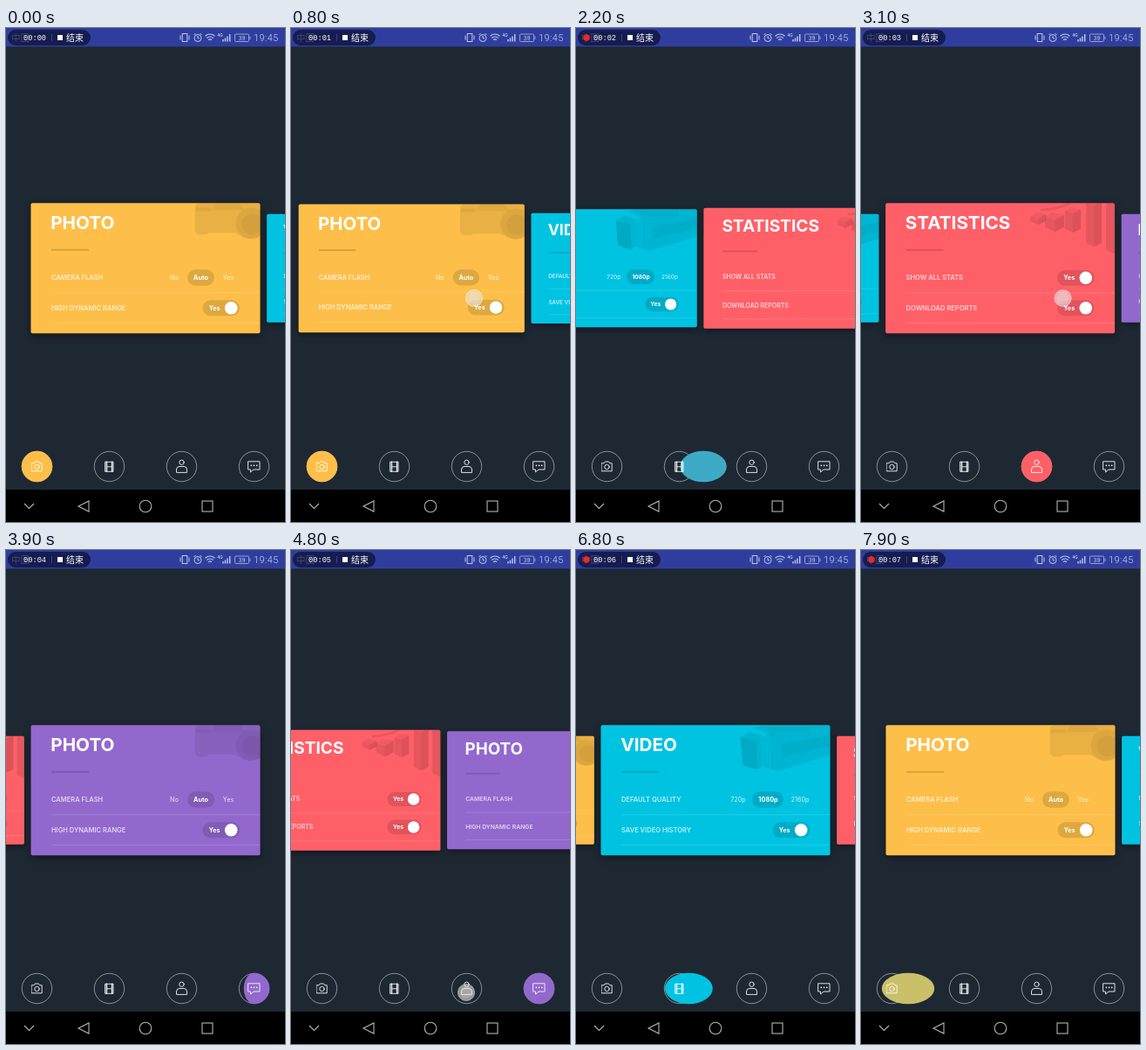
An HTML page for the animation above (8000 ms loop, 320 by 565 pixels).

```html
<!DOCTYPE html>
<html lang="en">
<head>
<meta charset="utf-8">
<title>Settings cards</title>
<style>
  html, body { margin: 0; width: 100%; height: 100%; overflow: hidden; background: #1e2833; }
  svg { display: block; width: 100%; height: 100%; }
  text { font-family: Inter, "Noto Sans CJK SC", sans-serif; fill: #fff; }
  .title { font-size: 20.7px; font-weight: 700; }
  .label { font-size: 7.55px; font-weight: 600; opacity: .72; }
  .option { font-size: 7.3px; text-anchor: middle; opacity: .8; }
  .chosen { font-weight: 700; opacity: 1; }
  .mono { font-family: "Liberation Mono", monospace; font-size: 8.7px; }
  .time { font-family: Roboto, sans-serif; font-size: 10.8px; font-weight: 300; letter-spacing: .5px; opacity: .8; }
  .shadow { filter: drop-shadow(0 3px 4px rgba(0, 0, 0, .4)); }
  .line { fill: none; stroke: #fff; stroke-width: .95; stroke-linejoin: round; stroke-linecap: round; opacity: .9; }
  .nav { fill: none; stroke: #b5b5b5; stroke-width: 1.1; }
  .status { fill: none; stroke: #c3c9e6; stroke-width: 1; }
</style>
</head>
<body>
<svg viewBox="0 0 320 565" preserveAspectRatio="none">
  <defs>
    <clipPath id="face"><rect width="263" height="149" rx="2"/></clipPath>
    <g id="camera">
      <path d="M188 5Q189 0 195 0H263V38Q250 44 240 37L234 34H204L201 36H192Q188 35 188 29Z" opacity=".08"/>
      <path d="M206 8L212 0H240L246 8Z" opacity=".04"/>
      <circle cx="253" cy="23" r="18" opacity=".05"/>
      <circle cx="254" cy="24" r="12" opacity=".04"/>
      <path d="M188 9H206V5H190Z" opacity=".05"/>
    </g>
    <g id="camcorder">
      <path d="M160 14L171 8L184 12V48L180 51L163 46Z" opacity=".08"/>
      <path d="M160 14L178 19L180 51L163 46Z" opacity=".06"/>
      <path d="M184 14L197 9V51L184 47Z" opacity=".06"/>
      <path d="M176 3L186 0H263V34L202 53L196 50V12Z" opacity=".07"/>
      <path d="M190 3H240V9H194ZM206 22L263 11V24L208 37Z" opacity=".04"/>
    </g>
    <g id="bars"></g>
  </defs>

  <rect width="320" height="565" fill="#1e2833"/>
  <g id="cards"></g>

  <g id="rings" fill="none" stroke="#fff" stroke-width=".8" opacity=".6"></g>
  <path id="bubble"/>
  <g class="line">
    <path d="M29.5 497.8H32L33.3 496H37.5L38.8 497.8H41.2V506.8H29.5Z"/>
    <circle cx="35.5" cy="502" r="2.7"/>
  </g>
  <g class="line">
    <rect x="114" y="496.3" width="9" height="11"/>
    <path d="M115.4 496.3V507.3M121.6 496.3V507.3" stroke-width="1.6"/>
    <path d="M116 501.8H121"/>
  </g>
  <g class="line">
    <circle cx="201.5" cy="496.8" r="2.7"/>
    <path d="M195.5 508V505Q195.5 501.5 199 501.5H204Q207.5 501.5 207.5 505V508Z"/>
  </g>
  <g class="line">
    <path d="M278 495.8H291V505H284L280.5 508V505H278Z"/>
    <path d="M281.3 500.4h.1M284.5 500.4h.1M287.7 500.4h.1" stroke-width="1.6"/>
  </g>

  <rect y="528" width="320" height="37"/>
  <g class="nav">
    <path d="M21 544L26.5 549.5L32 544"/>
    <path d="M95 541V553L83 547Z"/>
    <circle cx="160" cy="547" r="6.8"/>
    <rect x="225" y="541" width="12" height="12"/>
  </g>

  <rect width="320" height="21.3" fill="#2f3e9e"/>
  <rect x="2" y="2" width="95" height="18" rx="9" fill="#151d50"/>
  <text x="6" y="15" font-size="10.5" opacity=".2">中国</text>
  <circle id="rec" cx="12" cy="11" r="3.7" fill="#f5261f"/>
  <text id="clock" class="mono" x="20" y="14"></text>
  <path d="M52.5 7V15" stroke="#3b4474"/>
  <rect x="59" y="8" width="6" height="6" fill="#fff"/>
  <text x="69" y="14.8" font-size="10">结束</text>

  <g class="status">
    <rect x="202.2" y="6.5" width="5.6" height="9"/>
    <path d="M200 8.5V13.5M210 8.5V13.5"/>
    <circle cx="220" cy="11.5" r="4"/>
    <path d="M220 9V11.8H222M215.5 8L217.5 6M224.5 8L222.5 6"/>
    <path d="M228.5 9.2Q234 4.8 239.5 9.2M230.3 11.5Q234 8.5 237.7 11.5M232 13.6Q234 12 236 13.6M234 15.2v.3" stroke-width="1.2"/>
    <path d="M249 15.5V13M251.5 15.5V11.5M254 15.5V9.5M256.7 15.5V7" stroke-width="1.4"/>
    <g opacity=".7">
      <rect x="262.5" y="7" width="16" height="8.5" rx="1"/>
      <path d="M280 9.5V13"/>
    </g>
  </g>
  <text x="242.3" y="9.5" font-size="4.6">4G</text>
  <text x="270.5" y="13.8" font-size="6.5" text-anchor="middle" opacity=".75">39</text>
  <text class="time" x="284" y="15">19:45</text>

  <g id="touch">
    <circle r="9.6" fill="#e2e2e2" fill-opacity=".6" stroke="#fff" stroke-opacity=".4"/>
    <circle r="7" fill="#fff" fill-opacity=".15"/>
  </g>
</svg>
<script>
const $ = id => document.getElementById(id);
const COLORS = [[253, 191, 73], [0, 195, 226], [255, 96, 104], [147, 104, 205]];
const TAB_X = [35.5, 118.5, 201.5, 284.5], TAB_Y = 501.5, RADIUS = 17.8;
const rgb = c => `rgb(${c.map(Math.round)})`;
const clamp = v => Math.max(0, Math.min(1, v));
const mix = (a, b, k) => a + (b - a) * k;
const easeOut = (u, n) => 1 - (1 - clamp(u)) ** n;
const backOut = u => {
  const w = 1 - clamp(u);
  return 1 - 2.7 * w ** 3 + 1.7 * w ** 2;
};

// Each bar is a column: centre, top, half width, height
const bar = ([x, y, w, h]) => `
  <path d="M${x - w} ${y}L${x - w / 4} ${y - w / 2}L${x + w} ${y - w / 4}L${x} ${y + w / 3}Z" opacity=".06"/>
  <path d="M${x - w} ${y}L${x} ${y + w / 3}V${y + h}L${x - w} ${y + h - w / 2}Z" opacity=".1"/>
  <path d="M${x} ${y + w / 3}L${x + w} ${y - w / 4}V${y + h - w / 2}L${x} ${y + h}Z" opacity=".14"/>`;
$('bars').innerHTML = [[175, 15, 9, 10], [194, 16, 11, 17], [215, 9, 9, 25], [239, 0, 9, 50], [262, -12, 9, 70]].map(bar).join('')
  + '<path d="M178 8Q196 7 212 0" fill="none" stroke="#000" stroke-width="3" opacity=".09"/>';

const pill = (x, y, w, h) => `<rect x="${x}" y="${y}" width="${w}" height="${h}" rx="${h / 2}" opacity=".12"/>`;
const option = (x, s, on) => `<text class="option ${on ? 'chosen' : ''}" x="${x}" y="88.2">${s}</text>`;
const toggle = y => pill(197, y - 9, 42.5, 18)
  + `<text class="option chosen" x="210.7" y="${y + 2.7}">Yes</text><circle cx="229.7" cy="${y}" r="7.3" fill="#fff"/>`;
const flash = pill(179.5, 76, 31, 18.5) + option(164.5, 'No') + option(195, 'Auto', 1) + option(226.5, 'Yes');
const quality = pill(173.5, 76, 36, 18.5) + option(157.5, '720p') + option(192, '1080p', 1) + option(228.5, '2160p');

const PAGES = [
  ['PHOTO', 'CAMERA FLASH', 'HIGH DYNAMIC RANGE', flash, 'camera'],
  ['VIDEO', 'DEFAULT QUALITY', 'SAVE VIDEO HISTORY', quality, 'camcorder'],
  ['STATISTICS', 'SHOW ALL STATS', 'DOWNLOAD REPORTS', toggle(85.5), 'bars'],
  ['PHOTO', 'CAMERA FLASH', 'HIGH DYNAMIC RANGE', flash, 'camera']
];
$('cards').innerHTML = PAGES.map(([title, first, second, control, art], i) => `
  <g><rect class="shadow" width="263" height="149" rx="2" fill="${rgb(COLORS[i])}"/>
  <g clip-path="url(#face)">
    <use href="#${art}"/>
    <text class="title" x="22.7" y="29.7">${title}</text>
    <rect x="23.5" y="52.5" width="43" height="2" opacity=".15"/>
    <path d="M23.5 102.5H263M23.5 137H263" stroke="#fff" stroke-width=".8" opacity=".18"/>
    <text class="label" x="23.4" y="88.2">${first}</text>
    <text class="label" x="23.4" y="122.8">${second}</text>
    ${control}${toggle(120)}
  </g></g>`).join('');
const cards = [...$('cards').children];
$('rings').innerHTML = TAB_X.map(x => `<circle cx="${x}" cy="${TAB_Y}" r="17.2"/>`).join('');

// Swipes: drag for 300 ms, then settle. Taps: settle at once, bubble follows.
const swipe = (at, from) => ({ at, from, to: from + 1, drag: 300, settle: 650, bubble: at + 314 });
const tap = (at, from, x) => ({ at, from, to: from - 1, drag: 0, settle: 500, bubble: at + 634, x });
const MOVES = [swipe(650, 0), swipe(1850, 1), swipe(3080, 2),
  tap(4725, 3, 201), tap(6012, 2, 126), tap(7147, 1, 40)];
const DRAGGED = .35;

function pageAt(t) {
  let p = 0;
  for (const m of MOVES) {
    if (t < m.at) break;
    const start = m.drag ? DRAGGED : 0, e = t - m.at;
    const k = e < m.drag ? DRAGGED * (e / m.drag) ** 2 : mix(start, 1, easeOut((e - m.drag) / m.settle, 5));
    p = mix(m.from, m.to, k);
  }
  return p;
}

// The leading end arrives first; the trailing end catches up and overshoots
function drawBubble(t) {
  let head = TAB_X[0], tail = head, dir = 1, color = COLORS[0];
  for (const m of MOVES) {
    const e = t - m.bubble;
    if (e < 0) break;
    const a = TAB_X[m.from], b = TAB_X[m.to];
    dir = m.to - m.from;
    head = mix(a, b, easeOut(e / 205, 3));
    tail = mix(a, b, backOut(e / 700));
    color = COLORS[m.from].map((c, i) => mix(c, COLORS[m.to][i], clamp(e / 150)));
  }
  const front = head + dir * RADIUS, back = tail - dir * RADIUS;
  const left = Math.min(front, back), right = Math.max(front, back);
  // When squeezed, the leading side keeps its full curve
  const mid = right - left < 2 * RADIUS ? head : (left + right) / 2;
  const half = x => `A${Math.abs(x - mid)} ${RADIUS} 0 0 1 `;
  $('bubble').setAttribute('d', `M${mid} ${TAB_Y - RADIUS}${half(right)}${right} ${TAB_Y}${half(right)}${mid} ${TAB_Y + RADIUS}`
    + `${half(left)}${left} ${TAB_Y}${half(left)}${mid} ${TAB_Y - RADIUS}Z`);
  $('bubble').setAttribute('fill', rgb(color));
}

function drawTouch(t) {
  const m = MOVES.find(m => m.x ? t > m.at - 110 && t < m.at + 150 : t >= m.at && t < m.at + m.drag);
  $('touch').style.display = m ? '' : 'none';
  if (!m) return;
  const x = m.x || 232 - 88 * ((t - m.at) / m.drag) ** 2;
  $('touch').setAttribute('transform', `translate(${x} ${m.x ? 506 : 309})`);
}

function draw(t) {
  const p = pageAt(t);
  cards.forEach((card, i) => {
    const d = i - p, scale = 1 - .168 * Math.min(1, Math.abs(d));
    card.setAttribute('transform', `translate(${160 + d * 248.5} 274.8) scale(${scale}) translate(-131.5 -74.5)`);
    card.style.display = Math.abs(d) < 1.5 ? '' : 'none';
  });
  drawBubble(t);
  drawTouch(t);
  const seconds = t * .00095 + .48;
  $('clock').textContent = '00:0' + Math.floor(seconds);
  $('rec').style.display = seconds % 1 >= .5 ? '' : 'none';
}

const begin = performance.now();
function tick() {
  draw(Math.floor((performance.now() - begin) % 8000 / 100) * 100);
  requestAnimationFrame(tick);
}
tick();
</script>
</body>
</html>
```
